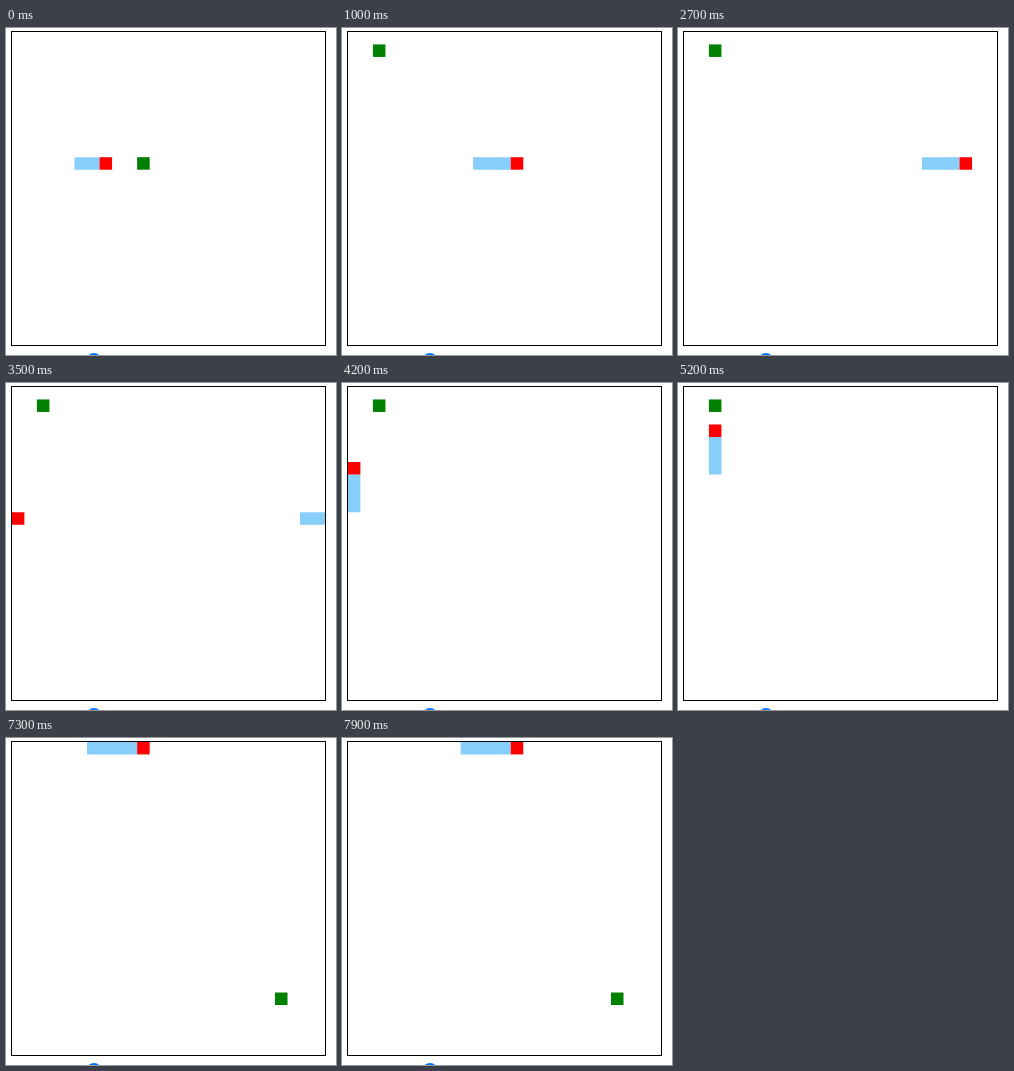
An HTML page for the animation above (8000 ms loop, 330 by 327 pixels).

```html
<!DOCTYPE html>
<html lang="en">
<head>
<meta charset="utf-8">
<title>Snake</title>
<style>
  html, body { margin: 0; width: 100%; height: 100%; overflow: hidden; background: #fff; }
  svg { display: block; }
</style>
</head>
<body>
<svg width="330" height="327" viewBox="0 0 330 327">
  <clipPath id="board"><rect x="6" y="4" width="313" height="313"/></clipPath>
  <rect x="5.5" y="3.5" width="314" height="314" fill="none" stroke="#000"/>
  <g clip-path="url(#board)">
    <path id="food" fill="green"/>
    <path id="body" fill="lightskyblue"/>
    <path id="head" fill="red"/>
  </g>
  <circle cx="88" cy="333" r="8" fill="#0075ff"/>
</svg>
<script>
const LOOP = 8000, TICK = 190.2, LEAD = 76, SAMPLE = 100;
const CELL = 12.53, LEFT = 5.85, TOP = 3.9;

// Game step shown at time t; the screen refreshes every SAMPLE ms.
function stepAt(t) {
  const end = (Math.floor(t / SAMPLE) + 1) * SAMPLE;
  return Math.ceil((end + LEAD) / TICK) - 1;
}

// Right and off the edge, back in on the left, up, aside, up, right.
function headAt(k) {
  if (k < 19) return [7 + k, 10];
  if (k < 24) return [0, 29 - k];
  if (k === 24) return [1, 6];
  if (k < 32) return [2, 31 - k];
  return [k - 29, 0];
}

// The snake grows one step after it eats.
const lengthAt = k => k < 4 ? 3 : k < 31 ? 4 : 5;
const foodAt = k => k < 3 ? [10, 10] : k < 30 ? [2, 1] : [21, 20];

const square = ([x, y]) =>
  `M${LEFT + x * CELL} ${TOP + y * CELL}h${CELL}v${CELL}h${-CELL}z`;

function setCells(id, cells) {
  document.getElementById(id).setAttribute("d", cells.map(square).join(""));
}

function render(t) {
  const k = stepAt(t);
  const body = [];
  for (let i = 1; i < lengthAt(k); i++) body.push(headAt(k - i));
  setCells("food", [foodAt(k)]);
  setCells("body", body);
  setCells("head", [headAt(k)]);
}

const start = performance.now();
function frame() {
  render((performance.now() - start) % LOOP);
  requestAnimationFrame(frame);
}
frame();
</script>
</body>
</html>
```
